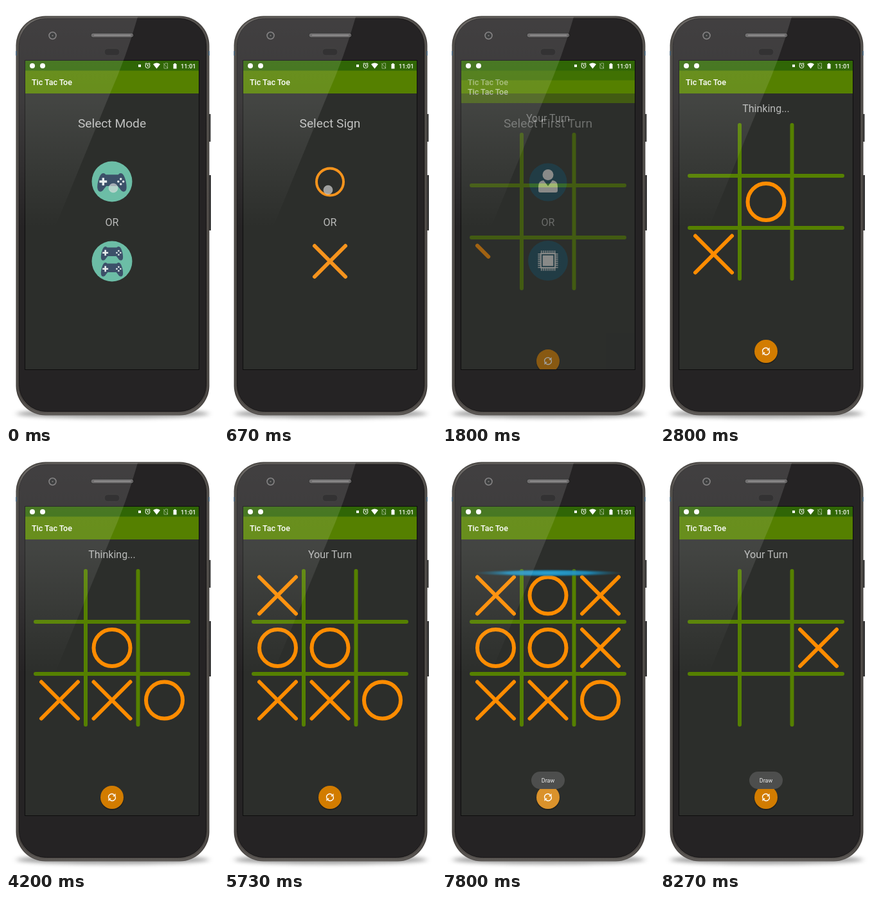
These frames come from a looping animation (330 px wide and 650 px high, 8.34 s). An HTML page:

```html
<!DOCTYPE html>
<html lang="en">
<head>
<meta charset="utf-8">
<title>Tic Tac Toe</title>
<style>
  html, body { margin: 0; width: 100%; height: 100%; overflow: hidden; background: #fff; }
  svg { display: block; width: 330px; height: 650px; font-family: Roboto, sans-serif; }
  .title { font-size: 19.2px; fill: #c1c2c1; text-anchor: middle; }
  .note { font-size: 16px; fill: #b9bab9; text-anchor: middle; }
  .line { fill: none; stroke-linecap: round; stroke-width: 6; }
  .mark { stroke: #ff8c00; }
</style>
</head>
<body>
<svg viewBox="0 0 330 650">
  <defs>
    <linearGradient id="rim" x2="0" y2="1">
      <stop stop-color="#4a4744"/><stop offset=".5" stop-color="#45413e"/>
      <stop offset=".95" stop-color="#423e3b"/><stop offset="1" stop-color="#5a5653"/>
    </linearGradient>
    <linearGradient id="shine" x2="0" y2="1">
      <stop stop-color="#fff" stop-opacity=".13"/>
      <stop offset=".4" stop-color="#fff" stop-opacity=".11"/>
      <stop offset="1" stop-color="#fff" stop-opacity="0"/>
    </linearGradient>
    <filter id="soft" x="-10%" y="-100%" width="120%" height="300%"><feGaussianBlur stdDeviation="5 3"/></filter>
    <radialGradient id="glow">
      <stop stop-color="#2ba3d4"/><stop offset=".55" stop-color="#1f8fbf" stop-opacity=".9"/>
      <stop offset="1" stop-color="#14607f" stop-opacity="0"/>
    </radialGradient>
    <clipPath id="screen"><path d="M30 85h270v480H30z"/></clipPath>
    <clipPath id="remaining"><rect id="sweepEdge" x="30" width="270" height="480"/></clipPath>

    <g id="window">
      <path fill="#2c2e2b" d="M30 85h270v480H30z"/>
      <path fill="#558000" d="M30 100h270v36H30z"/>
      <path fill="#306606" d="M30 85h270v15.500H30z"/>
      <text x="40" y="123" font-size="12.500" font-weight="500" fill="#fff">Tic Tac Toe</text>
    </g>
    <g id="pad">
      <path fill="#3c5069" d="M-15-14q3-1 5 2h20q2-3 5-2c5 1 9 17 8 24-1 7-7 6-10 1l-4-5H-9l-4 5c-3 5-9 6-10-1-1-7 3-23 8-24z"/>
      <path fill="none" stroke="#e8eeee" stroke-width="3.500" d="M-20-1h12M-14-7V5"/>
      <g fill="#e8eeee"><circle cx="14" cy="-5" r="1.800"/><circle cx="18" cy="-1" r="1.800"/><circle cx="10" cy="-1" r="1.800"/><circle cx="14" cy="3" r="1.800"/></g>
    </g>
  </defs>

  <!-- phone body -->
  <ellipse cx="166" cy="634" rx="150" ry="7" fill="#777" opacity=".7" filter="url(#soft)"/>
  <path fill="#333" d="M314 168h4.500v43H314zM314 263h5v86h-5z"/>
  <rect x="15.500" y="15.500" width="301" height="621" rx="46" fill="url(#rim)"/>
  <rect x="18" y="18" width="296" height="616" rx="44" fill="none" stroke="#66625f" stroke-width=".8"/>
  <rect x="20.500" y="19.500" width="291" height="611" rx="42" fill="#252324" stroke="#191718"/>
  <path stroke="#456a86" stroke-width="1.500" d="M16 70v7M316 70v7"/>
  <rect x="132" y="42" width="67" height="7" rx="3.500" fill="#5d5b5c" stroke="#171717"/>
  <path stroke="#858384" stroke-width="1.500" d="M137 45.500h57"/>
  <rect x="153" y="66" width="24" height="11" rx="5.500" fill="#171617" stroke="#2c2a2b"/>
  <circle cx="72.500" cy="46" r="5.500" fill="#252728" stroke="#777576" stroke-width="1.500"/>
  <circle cx="72.500" cy="46" r="2" fill="#555" stroke="#161616"/>
  <path fill="#0d0d0d" d="M29 84h272v482H29z"/>

  <g clip-path="url(#screen)">
    <g class="page">
      <use href="#window"/>
      <text class="title" x="165" y="188.500">Select Mode</text>
      <text class="note" x="165" y="342">OR</text>
      <circle cx="165" cy="273" r="31.500" fill="#6cbda6"/>
      <use href="#pad" transform="translate(165 274) scale(.98)"/>
      <circle cx="165" cy="397" r="31.500" fill="#6cbda6"/>
      <use href="#pad" transform="translate(165 384.500) scale(.74)"/>
      <use href="#pad" transform="translate(165 409.500) scale(.74)"/>
    </g>
    <g class="page">
      <use href="#window"/>
      <text class="title" x="165" y="188.500">Select Sign</text>
      <text class="note" x="165" y="342">OR</text>
      <g class="line" stroke="#f7941d">
        <circle cx="165" cy="273.500" r="21" stroke-width="4"/>
        <path d="M141 373l48 48M189 373l-48 48"/>
      </g>
    </g>
    <g class="page">
      <use href="#window"/>
      <text class="title" x="165" y="188.500">Select First Turn</text>
      <text class="note" x="165" y="342">OR</text>
      <g fill="#154f68"><circle cx="165" cy="274" r="29.500"/><circle cx="165" cy="396" r="31"/></g>
      <g fill="#fff">
        <circle cx="165" cy="262.500" r="8.500"/>
        <path d="M158 271l7 9 7-9q8 1 8 9v7q0 3-3 3h-24q-3 0-3-3v-7q0-8 8-9z"/>
      </g>
      <g transform="translate(165 396) scale(.92)">
        <path fill="#fff" d="M-13-13h26v26h-26z"/>
        <path fill="none" stroke="#154f68" stroke-width="2" d="M-10-10h20v20h-20z"/>
        <path fill="none" stroke="#fff" stroke-width="4" stroke-dasharray="1.600 1.650" d="M-12-15h25M-12 15h25M-15-12v25M15-12v25"/>
      </g>
    </g>
    <g class="page">
      <use href="#window"/>
      <text class="note" id="status" x="165" y="165"></text>
      <path class="line" stroke="#558000" d="M124 185v239M205.500 185v239M46 264h238M46 345h238"/>
      <g id="round" class="line mark" clip-path="url(#remaining)"></g>
      <g id="nextRound" class="line mark"></g>
      <ellipse id="sweep" cx="166" rx="117" ry="6" fill="url(#glow)"/>
      <circle cx="165" cy="538.500" r="18.500" fill="#000" opacity=".3"/>
      <circle cx="165" cy="537" r="18" fill="#d27c00"/>
      <circle id="press" cx="165" cy="537" r="18" fill="#fff"/>
      <g fill="none" stroke="#fff" stroke-width="1.400">
        <path d="M160 538.500a5 5 0 0 1 8.500-5M170 535.500a5 5 0 0 1-8.500 5"/>
        <path fill="#fff" stroke="none" d="M170.500 531v4.500H166zM159.500 543v-4.500h4.500z"/>
      </g>
      <g id="toast">
        <rect x="139" y="497" width="52" height="27" rx="13.500" fill="#4d4e4d"/>
        <text x="165" y="514" font-size="9" fill="#eee" text-anchor="middle">Draw</text>
      </g>
    </g>

    <!-- status bar -->
    <g fill="#fff">
      <circle cx="41" cy="93" r="4"/><circle cx="57" cy="93" r="4"/>
      <path d="M206 91h4v4h-4zM229 90.500q5.500-4 11 0l-5.500 7z"/>
      <path d="M260.500 90h1.500v-1h2v1h1.500v7.500h-5z"/>
      <text x="272" y="96.500" font-size="9.300" font-weight="500">11:01</text>
    </g>
    <g fill="none" stroke="#fff">
      <circle cx="220.500" cy="93" r="3.500"/><path d="M220.500 91v2.500h1.500M216.500 90l2-1.500M224.500 90l-2-1.500"/>
      <path opacity=".45" d="M246 97V91l2-2h3.500v8zM245 89l7 8"/>
    </g>
    <circle id="touch" r="7" fill="#ddd" fill-opacity=".65" stroke="#eee" stroke-opacity=".35"/>
  </g>
  <path fill="url(#shine)" d="M205 17Q187 80 162 136L76 345H20V62Q20 19 62 18z"/>
</svg>
<script>
const LOOP = 8340, SWEEP_START = 7790, SWEEP_END = 8130;
const $ = id => document.getElementById(id);
const clamp = v => Math.max(0, Math.min(1, v));
const progress = (t, start, duration) => clamp((t - start) / duration);
const easeOut = p => 1 - (1 - p) ** 2;

const pages = [...document.querySelectorAll('.page')];
const pageStarts = [-999, 130, 930, 1690];

// sign, column, row, start, duration
const moves = [
  ['X', 0, 2, 1790, 140], ['O', 1, 1, 2350, 300], ['X', 1, 2, 3590, 200],
  ['O', 2, 2, 3740, 190], ['X', 0, 0, 4390, 210], ['O', 0, 1, 5050, 300],
  ['X', 2, 1, 5740, 380], ['O', 1, 0, 6330, 340], ['X', 2, 0, 7060, 330],
  ['X', 2, 1, 8130, 130]
];
const messages = [
  [0, 'Your Turn'], [2450, 'Thinking...'], [3590, 'Your Turn'], [3900, 'Thinking...'],
  [4390, 'Your Turn'], [5070, 'Thinking...'], [5700, 'Your Turn'], [6400, 'Thinking...'],
  [7060, ''], [8130, 'Your Turn']
];
// x, y, start, end
const touches = [
  [167, 283, 0, 130], [162, 286, 600, 880], [165, 398, 1590, 1690], [165, 304, 2200, 2400],
  [246, 386, 3690, 3790], [84, 304, 5000, 5130], [165, 223, 6270, 6400], [165, 537, 7650, 7780]
];

function addStroke(parent, d) {
  const path = document.createElementNS('http://www.w3.org/2000/svg', 'path');
  path.setAttribute('d', d);
  path.setAttribute('pathLength', 1);
  return parent.appendChild(path);
}

const pieces = moves.map(([sign, col, row, start, duration]) => {
  const x = 83.5 + 81.5 * col, y = 223 + 81.5 * row, r = 28.5;
  const shapes = sign === 'X'
    ? [`M${x - r} ${y - r}l57 57`, `M${x + r} ${y - r}l-57 57`]
    : [`M${x + r} ${y}a${r} ${r} 0 1 1 -57 0a${r} ${r} 0 1 1 57 0`];
  const parent = $(start < SWEEP_START ? 'round' : 'nextRound');
  return { start, duration, strokes: shapes.map(d => addStroke(parent, d)) };
});

function render(t) {
  pages.forEach((page, i) => {
    const shift = 38 * (1 - easeOut(progress(t, pageStarts[i], 300)));
    page.setAttribute('opacity', progress(t, pageStarts[i], 200));
    page.setAttribute('transform', `translate(0 ${shift})`);
  });

  for (const { start, duration, strokes } of pieces) {
    const drawn = easeOut(progress(t, start, duration)) * strokes.length;
    strokes.forEach((stroke, i) => {
      const part = clamp(drawn - i);
      stroke.style.visibility = part ? 'visible' : 'hidden';
      stroke.setAttribute('stroke-dasharray', part < 1 ? `${part} 2` : 'none');
    });
  }
  $('status').textContent = messages.findLast(([start]) => t >= start)[1];

  const sweepY = 180 + 250 * progress(t, SWEEP_START, SWEEP_END - SWEEP_START);
  const sweeping = t >= SWEEP_START && t < SWEEP_END;
  $('sweep').setAttribute('cy', sweepY);
  $('sweep').setAttribute('opacity', sweeping ? 1 : 0);
  $('sweepEdge').setAttribute('y', t < SWEEP_START ? 85 : sweepY);
  $('toast').setAttribute('opacity', progress(t, 7330, 250));
  $('press').setAttribute('opacity', .17 * progress(t, 7680, 80) * (1 - progress(t, 7850, 400)));

  const touch = touches.find(([, , start, end]) => t >= start && t < end);
  $('touch').setAttribute('opacity', touch ? 1 : 0);
  if (touch) $('touch').setAttribute('transform', `translate(${touch[0]} ${touch[1]})`);
}

function tick() {
  render(performance.now() % LOOP);
  requestAnimationFrame(tick);
}
tick();
</script>
</body>
</html>
```
